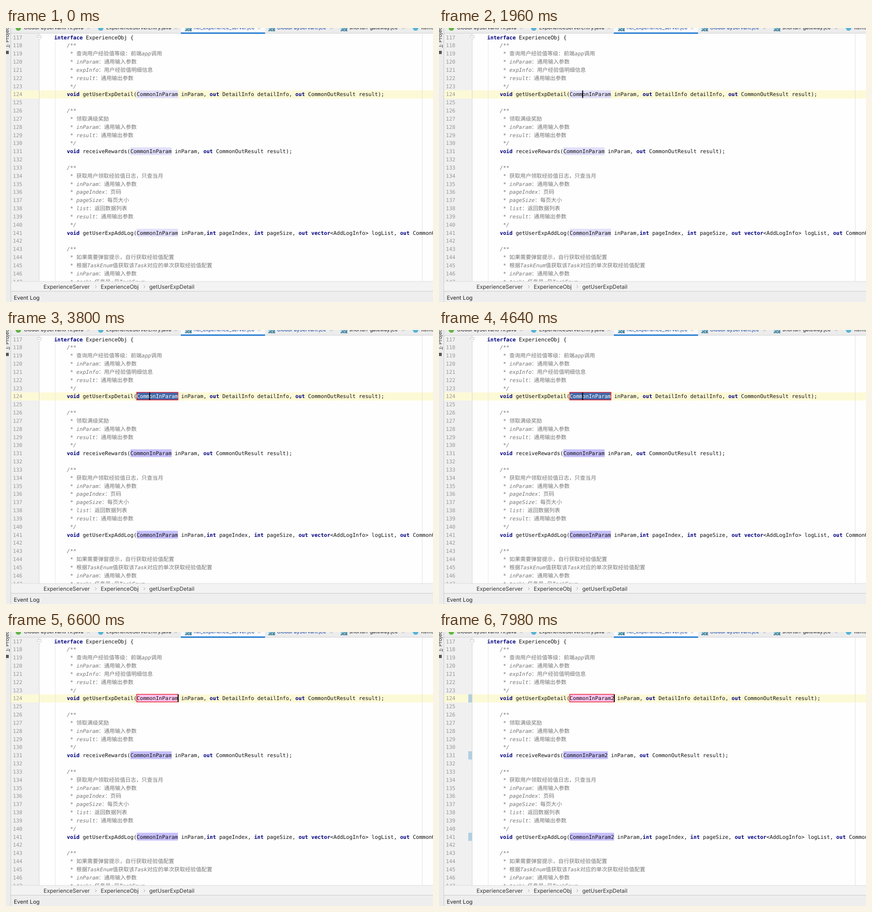
These frames come from a looping animation (933x600 px, 8 s). An HTML page with a canvas:

```html
<!DOCTYPE html>
<html lang="zh-CN">
<head>
<meta charset="utf-8">
<title>Rename</title>
<style>
html, body { margin: 0; width: 100%; height: 100%; overflow: hidden; background: #fff; }
canvas { display: block; }
</style>
</head>
<body>
<canvas id="stage" width="933" height="600"></canvas>
<script>
const ctx = document.getElementById('stage').getContext('2d');
ctx.textRendering = 'geometricPrecision';

const LOOP = 8000, BLINK = 560;
const RENAME = 2300, DESELECT = 6200, TYPE = 7600;
const COL = 6.935, ROW = 17.83, TOP = 11.7, LEFT = 133, FIRST = 117;
const MONO = '11.52px "DejaVu Sans Mono", monospace';
const CJK_SIZE = 11.87;
const CJK = CJK_SIZE + 'px "Noto Sans CJK SC", "Noto Sans CJK", sans-serif';
const ui = (size, weight = 400) => `${weight} ${size}px Inter, sans-serif`;

// '@' marks the identifier being renamed
const lines = [
  'interface ExperienceObj {',
  '/**',
  ' * 查询用户经验值等级：前端app调用',
  ' * inParam：通用输入参数',
  ' * expInfo：用户经验值明细信息',
  ' * result：通用输出参数',
  ' */',
  'void getUserExpDetail(@ inParam, out DetailInfo detailInfo, out CommonOutResult result);',
  '',
  '/**',
  ' * 领取满级奖励',
  ' * inParam：通用输入参数',
  ' * result：通用输出参数',
  ' */',
  'void receiveRewards(@ inParam, out CommonOutResult result);',
  '',
  '/**',
  ' * 获取用户领取经验值日志，只查当月',
  ' * inParam：通用输入参数',
  ' * pageIndex：页码',
  ' * pageSize：每页大小',
  ' * list：返回数据列表',
  ' * result：通用输出参数',
  ' */',
  'void getUserExpAddLog(@ inParam,int pageIndex, int pageSize, out vector<AddLogInfo> logList, out CommonOutResult result);',
  '',
  '/**',
  ' * 如果需要弹窗提示，自行获取经验值配置',
  ' * 根据TaskEnum值获取该Task对应的单次获取经验值配置',
  ' * inParam：通用输入参数',
  ' * task：任务号:见TaskEnum'
];
const CARET_ROW = 7;

const rowTop = i => TOP + i * ROW;
const baseline = i => rowTop(i) + 12.9;

function rect(x, y, w, h, color) {
  ctx.fillStyle = color;
  ctx.fillRect(x, y, w, h);
}

function text(str, x, y, font, color) {
  ctx.font = font;
  ctx.fillStyle = color;
  ctx.fillText(str, x, y);
}

function path(points, color) {
  ctx.beginPath();
  points.forEach(([x, y]) => ctx.lineTo(x, y));
  ctx.strokeStyle = color;
  ctx.lineWidth = 1;
  ctx.stroke();
}

function disc(x, y, r, color) {
  ctx.fillStyle = color;
  ctx.beginPath();
  ctx.arc(x, y, r, 0, 7);
  ctx.fill();
}

function drawComment(str, y) {
  let x = LEFT;
  for (const run of str.match(/[\u2e80-\uffff]+|[^\u2e80-\uffff]+/g) || []) {
    const wide = run.charCodeAt(0) >= 0x2e80;
    text(run, x, y, wide ? CJK : 'italic ' + MONO, '#777');
    x += run.length * (wide ? CJK_SIZE : COL);
  }
}

function drawCode(str, x, y) {
  for (const token of str.match(/\w+|\s+|[^\w\s]+/g) || []) {
    const keyword = /^(interface|void|out|int|vector)$/.test(token);
    text(token, x, y, keyword ? 'bold ' + MONO : MONO, keyword ? '#000080' : '#111');
    x += token.length * COL;
  }
}

function drawIdentifier(name, x, row, t) {
  const y = rowTop(row), w = name.length * COL;
  const active = row === CARET_ROW && t >= RENAME;
  const selected = active && t < DESELECT;
  let fill = t < RENAME ? '#e2e0fb' : '#c5bffb';
  if (active) fill = selected ? '#4068a8' : '#fbc4f0';
  rect(x, y, w, 17, fill);
  if (active) {
    ctx.strokeStyle = '#e8202a';
    ctx.lineWidth = 1.5;
    ctx.strokeRect(x, y, w, 16.6);
  }
  text(name, x, baseline(row), MONO, selected ? '#fff' : '#111');
}

function drawCaret(t) {
  const reset = t >= TYPE ? TYPE : t >= DESELECT ? DESELECT : t >= RENAME ? RENAME : -BLINK;
  if (Math.floor((t - reset) / BLINK) % 2) return;
  const col = t >= TYPE ? 36 : t >= DESELECT ? 35 : 26;
  rect(LEFT + col * COL - 0.5, rowTop(CARET_ROW) + 0.3, 2, 16.5, '#000');
}

function drawEditor(t) {
  const name = 'CommonInParam' + (t >= TYPE ? '2' : '');
  rect(0, 0, 933, 600, '#fefefe');
  rect(11, 12, 61, 543, '#f0f0f0');
  rect(11, rowTop(CARET_ROW), 922, ROW, '#fcf9d6');
  rect(72, 12, 1, 543, '#d4d4d4');
  rect(107, 30, 1, 525, '#e6e6e6');
  rect(909, 12, 1, 543, '#e0e0e0');

  lines.forEach((line, i) => {
    const y = baseline(i);
    text(String(FIRST + i), 15, y, MONO, '#999');
    if (/^ ?[/*]/.test(line)) return drawComment(line, y);
    const x = i ? LEFT : LEFT - 4 * COL;
    const [before, after] = line.split('@');
    drawCode(before, x, y);
    if (after === undefined) return;
    const nameX = x + before.length * COL;
    drawIdentifier(name, nameX, i, t);
    drawCode(after, nameX + name.length * COL, y);
    if (t >= TYPE) rect(64, rowTop(i), 8, ROW, '#b1cfe1');
  });
  drawCaret(t);

  ctx.fillStyle = '#fff';
  ctx.fillRect(68, 16, 8, 9);
  path([[68.5, 16.5], [76.5, 16.5], [76.5, 22], [72.5, 26], [68.5, 22], [68.5, 16.5]], '#c4c4c4');
  path([[70.5, 20.5], [74.5, 20.5]], '#b0b0b0');
}

function drawTabs() {
  const tabs = [
    [39, 'CloudPayServantPrx.java', '#222', 180, '#62b543'],
    [219, 'ExperienceServerEntry.java', '#222', 371, '#55b4d4'],
    [410, 'hel_experience_server.jce', '#123f9e', 553],
    [592, 'CloudPayServant.jce', '#123f9e', 711],
    [750, 'shorturl-gateway.jce', '#222', 868],
    [907, 'ItemServer.java', '#222', 1020, '#55b4d4']
  ];
  rect(0, 0, 933, 12, '#ececec');
  rect(11, 11, 922, 1, '#d0d0d0');
  rect(382, 0, 184, 10, '#fbfbfb');
  rect(382, 9.7, 184, 3, '#1f78d1');
  for (const [x, label, color, closeX, dot] of tabs) {
    text(label, x, 3, ui(10.9), color);
    path([[closeX - 3, -3], [closeX + 3, 3]], '#aaa');
    path([[closeX - 3, 3], [closeX + 3, -3]], '#aaa');
    if (dot) {
      disc(x - 12, 0, 6, dot);
    } else {
      rect(x - 19, 0, 15, 7, '#a9d9ec');
      text('JCE', x - 19, 6.5, ui(8, 700), '#174c63');
    }
  }
}

function drawSidebar() {
  rect(0, 0, 10, 600, '#ececec');
  rect(10, 0, 1, 600, '#c9c9c9');
  ctx.save();
  ctx.translate(5.5, 43);
  ctx.rotate(-Math.PI / 2);
  text('1: Project', 0, 0, ui(11.5), '#333');
  ctx.restore();
  rect(7, 37, 1, 6, '#333');
  rect(0, 50, 6, 7, '#555');
}

function drawStatus() {
  rect(11, 555, 922, 22, '#f3f3f3');
  rect(11, 554.5, 922, 1, '#dcdcdc');
  rect(11, 577, 922, 23, '#eeeeee');
  rect(11, 576, 922, 1, '#c9c9c9');
  text('ExperienceServer', 82, 570.5, ui(12), '#333');
  text('ExperienceObj', 207, 570.5, ui(12), '#333');
  text('getUserExpDetail', 313, 570.5, ui(12), '#333');
  for (const x of [195, 301]) path([[x, 563.5], [x + 2.5, 566.5], [x, 569.5]], '#999');
  text('Event Log', 17, 595, ui(12), '#222');
}

function draw(now) {
  drawEditor(now % LOOP);
  drawTabs();
  drawStatus();
  drawSidebar();
  requestAnimationFrame(draw);
}
requestAnimationFrame(draw);
</script>
</body>
</html>
```
